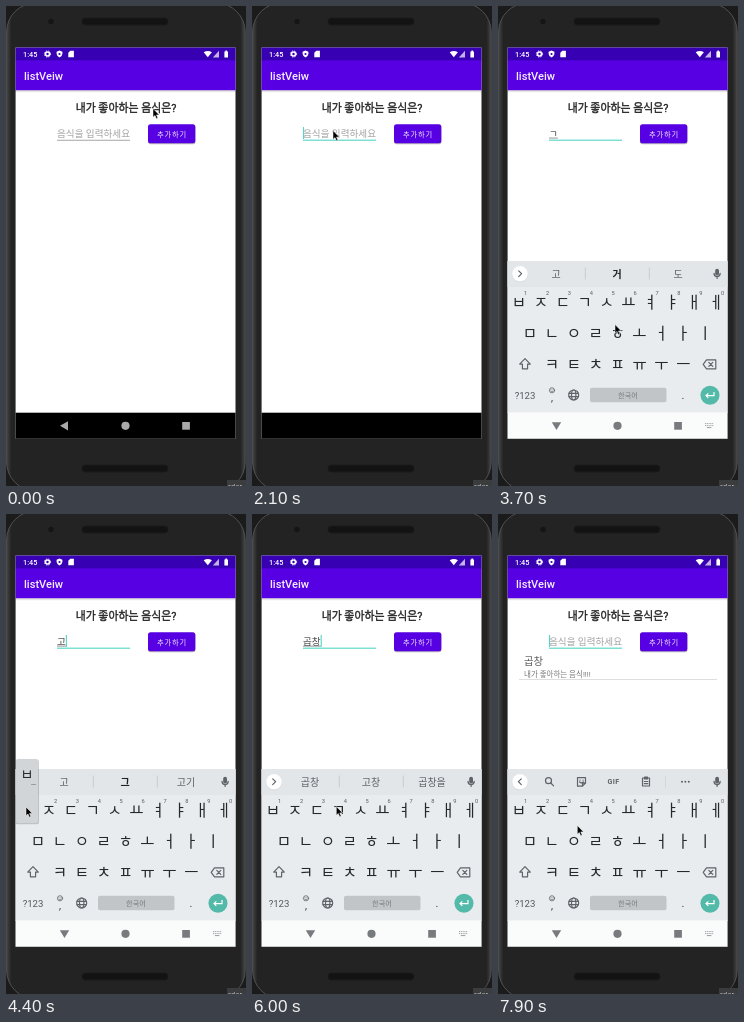
An HTML page that plays this animation: 240x480 px, repeating every 8 s.

```html
<!DOCTYPE html>
<html lang="ko">
<head>
<meta charset="utf-8">
<title>listVeiw</title>
<style>
  html, body { margin: 0; width: 100%; height: 100%; overflow: hidden; background: #1b1b1b; }
  svg { display: block; width: 100%; height: 100%; }
  text { font-family: Roboto, "Noto Sans CJK KR", "Noto Sans CJK", sans-serif; }
  .mid { text-anchor: middle; }
  .key { font-size: 15.5px; fill: #25292c; text-anchor: middle; }
  .num { font-size: 5.7px; fill: #585c60; text-anchor: middle; }
  .word { font-size: 10px; fill: #5c6064; text-anchor: middle; }
  .line { fill: none; stroke: #5f6468; stroke-width: 1.2; stroke-linejoin: round; stroke-linecap: round; }
</style>
</head>
<body>
<svg viewBox="0 0 240 480" preserveAspectRatio="none">
  <defs>
    <clipPath id="screenClip"><rect x="9.6" y="41.5" width="219.9" height="391.3"/></clipPath>
    <linearGradient id="shade" x2="0" y2="1">
      <stop stop-color="#000" stop-opacity=".2"/><stop offset="1" stop-color="#000" stop-opacity="0"/>
    </linearGradient>
    <linearGradient id="shell">
      <stop stop-color="#454545"/><stop offset=".02" stop-color="#232323"/>
      <stop offset=".98" stop-color="#232323"/><stop offset="1" stop-color="#454545"/>
    </linearGradient>
  </defs>

  <!-- phone -->
  <rect width="240" height="480" fill="#1b1b1b"/>
  <rect x=".6" y="-3" width="238.6" height="488" rx="29" fill="url(#shell)" stroke="#505050"/>
  <rect x="76" y="12" width="86" height="7" rx="3.5" fill="#131313" stroke="#1a1a1a"/>
  <rect x="76" y="459" width="86" height="7" rx="3.5" fill="#131313" stroke="#1a1a1a"/>
  <circle cx="45" cy="15.5" r="2.7" fill="#151515"/>
  <rect x="221" y="474" width="19" height="6" fill="#3b3c3e"/>
  <text x="222" y="483" font-size="8" fill="#b5b7b9">rder</text>

  <g clip-path="url(#screenClip)">
    <rect x="9" y="41" width="221" height="392" fill="#fff"/>
    <rect x="9" y="84.2" width="221" height="2.6" fill="url(#shade)"/>
    <rect x="9" y="54" width="221" height="30.2" fill="#5800e4"/>
    <rect x="9" y="41" width="221" height="13.4" fill="#3700b3"/>
    <text x="18" y="73.5" font-size="11.1" font-weight="500" fill="#f4eefd">listVeiw</text>

    <!-- status bar -->
    <g fill="#fff">
      <text x="17" y="50.5" font-size="7.3" font-weight="500">1:45</text>
      <circle cx="41.5" cy="48" r="2" fill="none" stroke="#fff" stroke-width="1.6"/>
      <circle cx="41.5" cy="48" r="3.1" fill="none" stroke="#fff" stroke-width=".9" stroke-dasharray="1.3 1.2"/>
      <path d="M53.5 44.5l2.9 1.2v2.4q-.4 2.5-2.9 3.5q-2.5-1-2.9-3.5v-2.4z"/>
      <circle cx="53.5" cy="48" r="1.1" fill="#3700b3"/>
      <path d="M64.3 44.8h3.6v6.5h-5.6v-4.5z"/>
      <path d="M197.7 46.3q4.1-2.8 8.2 0l-4.1 5z"/>
      <path d="M213 44.8v6.6h-6.2z" opacity=".7"/>
      <path d="M218.4 45.4h1v-.8h1.6v.8h1v6h-3.6z"/>
    </g>

    <!-- form -->
    <text class="mid" x="120" y="106.4" font-size="10.9" fill="#222" stroke="#222" stroke-width=".32">내가 좋아하는 음식은?</text>
    <text id="hint" x="51" y="130.7" font-size="9.6" fill="#a2a2a2">음식을 입력하세요</text>
    <text id="typed" x="51" y="130.7" font-size="9.6" fill="#444"></text>
    <rect id="composing" x="51" y="131.7" height=".7" fill="#666"/>
    <rect id="fieldLine" x="51" width="73"/>
    <rect id="caret" y="121" width="1.1" height="12" fill="#55d6c8"/>
    <rect x="142" y="119" width="47.5" height="19.3" rx="2.5" fill="#000" opacity=".28"/>
    <rect x="142" y="118.2" width="47.3" height="19.1" rx="2.5" fill="#5800e4"/>
    <text x="151" y="130.5" font-size="7.3" letter-spacing=".75" font-weight="500" fill="#f4eefd">추가하기</text>

    <g id="item">
      <text x="26" y="151.3" font-size="10.4" fill="#5e5e5e">곱창</text>
      <text x="26" y="162.6" font-size="7.5" fill="#787878">내가 좋아하는 음식!!!!</text>
      <rect x="21" y="165" width="198" height="1" fill="#dedede"/>
    </g>

    <!-- navigation -->
    <rect x="9" y="406.7" width="221" height="27" fill="#000"/>
    <g id="darkNav" fill="#a9a9a9">
      <path d="M54 419.8l8-4.6v9.2z"/><circle cx="119.5" cy="419.8" r="4.1"/><rect x="176.2" y="416" width="7.7" height="7.7"/>
    </g>

    <g id="keyboard">
      <rect x="9" y="255" width="221" height="152" fill="#e8ecef"/>
      <rect x="9" y="255" width="221" height="26" fill="#e2e6e9"/>
      <rect x="9" y="406.4" width="221" height="27" fill="#fafbfb"/>
      <g fill="#777b7e">
        <path d="M53.8 416.3h9.4l-4.7 7.6z"/><circle cx="119.5" cy="419.8" r="4.1"/><rect x="176.2" y="416" width="7.7" height="7.7"/>
        <g fill="none" stroke="#9a9da0" stroke-width="1">
          <path d="M207 417.6h8.2M207 419.6h8.2" stroke-dasharray="1.1 .7"/><path d="M208.8 421.6h4.6"/>
        </g>
      </g>

      <circle cx="22" cy="268.2" r="8" fill="#ced2d5"/>
      <circle cx="22" cy="267.7" r="7.8" fill="#fff"/>
      <path id="chevron" class="line"/>
      <g class="line" stroke-width="1">
        <rect x="217.8" y="263.4" width="2.6" height="5.6" rx="1.3" fill="#5f6468"/>
        <path d="M216 267.4q.2 3.2 3.1 3.2q2.9 0 3.1-3.2M219.1 270.6v1.8"/>
      </g>
      <g id="tools">
        <g class="line">
          <circle cx="50.5" cy="266.7" r="3"/><path d="M52.8 269l2.8 2.8"/>
          <path d="M79.5 263.7h8v5.5l-3 3h-5zM87.5 269.2h-3v3M81.5 267.8q2 2 4 0M82 266v.2M85 266v.2"/>
          <path d="M144.5 264h7v8h-7zM146.5 263.2h3v1.8h-3zM146.3 267.5h3.5M146.3 269.6h3.5"/>
        </g>
        <path d="M167.5 262v11.5" stroke="#d3d7da"/>
        <text class="mid" x="115.5" y="270.3" font-size="7.2" font-weight="700" letter-spacing=".3" fill="#5f6468">GIF</text>
        <g fill="#5f6468"><circle cx="184" cy="267.8" r="1"/><circle cx="187.4" cy="267.8" r="1"/><circle cx="190.8" cy="267.8" r="1"/></g>
      </g>
      <g id="words">
        <path d="M87.3 261.5v12M151.3 261.5v12" stroke="#c8ccce"/>
        <text class="word" x="58" y="271.5"></text>
        <text class="word" x="119" y="271.5"></text>
        <text class="word" x="180" y="271.5"></text>
      </g>

      <g id="keys"></g>
      <g class="line">
        <path d="M27 352.6l5.3 5.5h-2.7v4.7h-5.2v-4.7h-2.7z"/>
        <path d="M208.5 353.8h9.3v9h-9.3l-3.3-4.5zM210.8 356.4l4 4M214.8 356.4l-4 4"/>
        <circle cx="75.7" cy="389" r="5"/><ellipse cx="75.7" cy="389" rx="2.2" ry="5"/><path d="M71 387.3h9.4M71 390.7h9.4"/>
        <circle cx="54" cy="384.3" r="2.6" stroke-width=".8"/><path d="M52.8 385.2q1.2 1 2.4 0M53 383.6h.1M55 383.6h.1" stroke-width=".7"/>
      </g>
      <text class="mid" x="27" y="392.6" font-size="9.6" fill="#53575b">?123</text>
      <text class="mid" x="54" y="395" font-size="10" fill="#333">,</text>
      <text class="mid" x="185" y="392.5" font-size="11" fill="#333">.</text>
      <rect x="92" y="381.8" width="76.5" height="14.5" rx="2" fill="#c2c5c7"/>
      <text class="mid" x="130" y="391.8" font-size="7.2" fill="#777b7e">한국어</text>
      <circle cx="212" cy="389.2" r="9.5" fill="#53b9a8"/>
      <path d="M216 386v3.6h-8M210.3 387.3l-2.3 2.3l2.3 2.3" fill="none" stroke="#fff" stroke-width="1.2"/>

      <g id="popup">
        <rect x="-11.6" y="-50.5" width="23.6" height="64.8" rx="2.2" fill="#000" opacity=".18"/>
        <rect x="-11" y="-51" width="22" height="64" rx="2" fill="#d2d5d8"/>
        <text class="key" y="-31.5" style="font-size:14px"></text>
        <path d="M4-25.5h5" stroke="#8b8f92" stroke-width=".8"/>
      </g>
    </g>
  </g>

  <path id="pointer" d="M0 0v8.8l2-1.8l1.4 3.2l1.5-.7l-1.4-3.1h2.8z" fill="#000" stroke="#fff" stroke-width=".5"/>
</svg>

<script>
const LOOP = 8000, STEP = 100;
const FOCUS = 1700, NAV_OFF = 1800, KEYBOARD_IN = 2200, ADDED = 6800, PRESS = 200;
const $ = id => document.getElementById(id);
const show = (id, on) => $(id).setAttribute('visibility', on ? 'inherit' : 'hidden');
const set = (id, attrs) => { for (const k in attrs) $(id).setAttribute(k, attrs[k]); };

const PITCH = 21.9;
const rows = [
  { letters: 'ㅂㅈㄷㄱㅅㅛㅕㅑㅐㅔ', x: 21, y: 296 },
  { letters: 'ㅁㄴㅇㄹㅎㅗㅓㅏㅣ', x: 32, y: 327 },
  { letters: 'ㅋㅌㅊㅍㅠㅜㅡ', x: 54, y: 358 }
];
const keyAt = {};

function addText(cls, x, y, content) {
  const el = document.createElementNS('http://www.w3.org/2000/svg', 'text');
  el.setAttribute('class', cls);
  el.setAttribute('x', x);
  el.setAttribute('y', y);
  el.textContent = content;
  $('keys').append(el);
}
rows.forEach((row, r) => [...row.letters].forEach((letter, i) => {
  const x = row.x + i * PITCH;
  keyAt[letter] = [x, row.y];
  addText('key', x, row.y + 5.6, letter);
  if (r === 0) addText('num', x + 6.6, row.y - 6.8, (i + 1) % 10);
}));

// key presses: start time, key, resulting text, suggestions
const presses = [
  [2800, 'ㄱ', 'ㄱ', '고 거 도'],
  [3800, 'ㅗ', '고', '고 그 고기'],
  [4300, 'ㅂ', '곱', '곱 곱창 곱게'],
  [4700, 'ㅊ', '곱ㅊ', '곱ㅊ 곱창 고베'],
  [5300, 'ㅏ', '곱차', '곱차 곱창 고차'],
  [5600, 'ㅇ', '곱창', '곱창 고창 곱창을']
];

// pointer stops: time, x, y
const path = [
  [0, 147, 102.5], [100, 138, 108], [300, 138, 108], [400, 84, 125], [700, 84, 125],
  [1100, 79, 122], [1500, 81, 124.6], [2300, 81, 124.6], [2700, 86, 290.5], [3300, 86, 290.5],
  [3700, 117, 318.5], [3800, 138, 325], [4000, 138, 325], [4300, 20, 293], [4450, 20, 293],
  [4700, 95, 355], [4850, 95, 355], [5200, 178, 328.5], [5400, 180, 327], [5600, 74, 325],
  [5750, 74, 325], [6000, 84.3, 292.5], [6500, 164, 126], [7100, 164, 126], [7700, 82, 300], [7900, 79.3, 311.5]
];
const ease = u => u * u * (3 - 2 * u);

function pointerAt(t) {
  const i = path.findIndex(p => p[0] > t);
  if (i < 0) return path[path.length - 1].slice(1);
  const [t0, x0, y0] = path[i - 1], [t1, x1, y1] = path[i];
  const u = ease((t - t0) / (t1 - t0));
  return [x0 + (x1 - x0) * u, y0 + (y1 - y0) * u];
}

function draw(t) {
  const focused = t >= FOCUS, added = t >= ADDED;
  const done = presses.filter(p => t >= p[0] + PRESS).pop();
  const entry = added ? null : done;
  const text = entry ? entry[2] : '';
  const width = text.length * 9.6 * 0.92;

  $('typed').textContent = text;
  show('hint', !text);
  show('composing', text);
  set('composing', { width });
  set('fieldLine', focused
    ? { y: 133.6, height: 1.2, fill: '#5fd9ca' }
    : { y: 133.8, height: 0.8, fill: '#8f8f8f' });
  const edited = added ? ADDED : done ? done[0] + PRESS : FOCUS;
  show('caret', focused && Math.floor((t - edited) / 500) % 2 === 0);
  set('caret', { x: 51 + width });
  show('item', added);

  show('darkNav', t < NAV_OFF);
  show('keyboard', t >= KEYBOARD_IN);
  const left = Math.max(0, 1 - (t - KEYBOARD_IN + STEP) / 300);
  set('keyboard', { transform: `translate(0 ${178 * left * left})` });

  show('tools', !text);
  show('words', text);
  set('chevron', { d: text ? 'M20.7 264.8l2.9 2.9l-2.9 2.9' : 'M23.3 264.8l-2.9 2.9l2.9 2.9' });
  if (entry) {
    const words = entry[3].split(' ');
    document.querySelectorAll('.word').forEach((el, i) => {
      const strong = i === 1 && text.length === 1;
      el.textContent = words[i];
      el.style.fontWeight = strong ? 700 : 400;
      el.style.fill = strong ? '#202326' : '';
    });
  }

  const held = presses.find(p => t >= p[0] && t < p[0] + PRESS);
  show('popup', held);
  if (held) {
    set('popup', { transform: `translate(${keyAt[held[1]]})` });
    $('popup').querySelector('text').textContent = held[1];
  }
  set('pointer', { transform: `translate(${pointerAt(t)})` });
}

const start = performance.now();
function tick() {
  const t = (performance.now() - start) % LOOP;
  draw(Math.floor(t / STEP) * STEP);
  requestAnimationFrame(tick);
}
tick();
</script>
</body>
</html>
```
